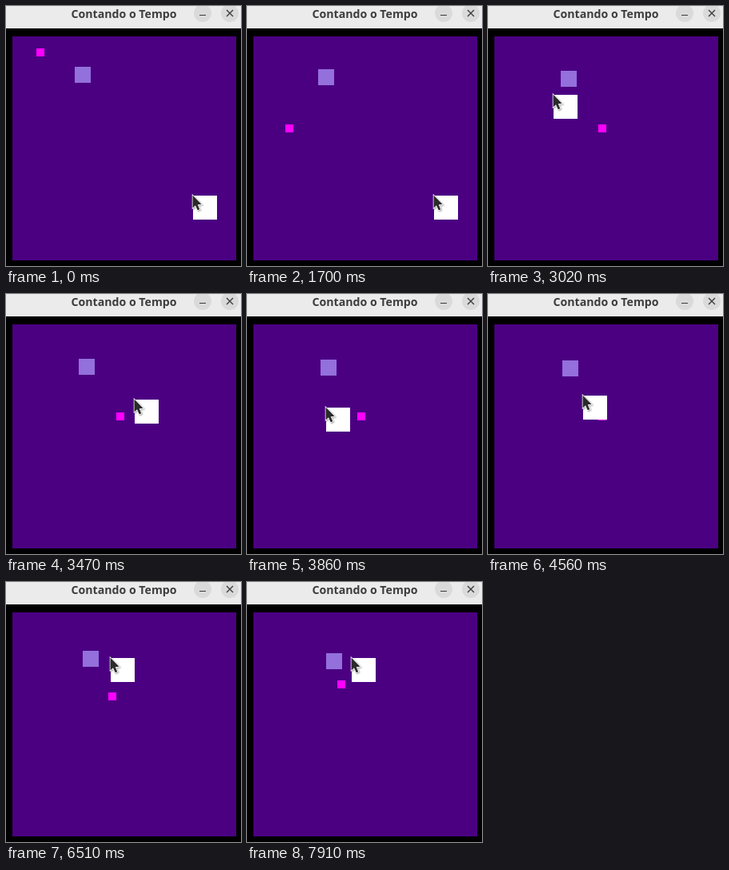
Animation, 294 px wide and 325 px high, one loop 8000 ms. Source, as an HTML page with a canvas:

```html
<!DOCTYPE html>
<html lang="pt">
<head>
<meta charset="utf-8">
<title>Contando o Tempo</title>
<style>
html, body { margin: 0; width: 294px; height: 325px; overflow: hidden; background: #000; }
canvas { display: block; }
</style>
</head>
<body>
<canvas id="stage" width="294" height="325"></canvas>
<script>
const ctx = document.getElementById('stage').getContext('2d');
const LOOP = 8000, TICK = 77.4; // ms

// Key points: tick, then the values reached there
const drift = [[0, 0.24], [24.5, 4], [68, 8], [101, 13]];
const down = [[0, 0], [8, 19]];
const right = [[15, 0], [16, 1], [21, 1], [22, 2], [30, 20]];
const taps = [[71, 0], [72, 1], [84, 4], [89, 5], [96, 8], [102, 10]];
// Centre x, centre y and radius of the circling hand
const orbit = [
  [30, 234, 237, 0], [32, 218, 191, 0], [39, 118.5, 141.8, 46], [50, 128, 133.5, 30],
  [59, 138.8, 129.9, 20], [68, 134, 97, 0], [70, 131, 95, 0]
];

const clamp = (v, lo, hi) => Math.max(lo, Math.min(hi, v));

function along(points, n) {
  n = clamp(n, points[0][0], points.at(-1)[0]);
  const i = Math.max(1, points.findIndex(p => p[0] >= n));
  const a = points[i - 1], b = points[i];
  const f = (n - a[0]) / (b[0] - a[0]);
  return a.slice(1).map((v, k) => v * (1 - f) + b[k + 1] * f);
}

const steps = (points, n) => Math.floor(along(points, n)[0] + 1e-6);

function hand(n) {
  const [cx, cy, r] = along(orbit, n);
  const angle = 2 * Math.PI * (n - 40) / 9.6;
  return [Math.round(cx - r * Math.cos(angle)), Math.round(cy + 1.1 * r * Math.sin(angle))];
}

function box(color, x, y, w, h = w) {
  ctx.fillStyle = color;
  ctx.fillRect(x, y, w, h);
}

function button(x) {
  ctx.fillStyle = '#dadada';
  ctx.beginPath();
  ctx.arc(x, 9, 11, 0, 7);
  ctx.fill();
}

function titleBar() {
  box('#ebebeb', 0, 0, 294, 28);
  ctx.fillStyle = '#3d3d3d';
  ctx.font = 'bold 14.15px "Open Sans", "Noto Sans", sans-serif';
  ctx.textAlign = 'center';
  ctx.fillText('Contando o Tempo', 147.5, 15);
  button(246);
  button(280);
  box('#3d3d3d', 242, 11, 8, 1);
  ctx.strokeStyle = '#3d3d3d';
  ctx.lineWidth = 1.4;
  ctx.stroke(new Path2D('M276 5l8 8M284 5l-8 8'));
}

const arrow = new Path2D('M.5 .5V16.5L4 13.3L6.7 19.3L9.3 18.2L6.7 12.3L11.5 11.8Z');
function pointer(x, y) {
  ctx.save();
  ctx.translate(x, y);
  ctx.strokeStyle = '#fff';
  ctx.lineWidth = 1.5;
  ctx.shadowColor = 'rgba(0, 0, 0, 0.4)';
  ctx.shadowBlur = 2;
  ctx.shadowOffsetX = ctx.shadowOffsetY = 1;
  ctx.stroke(arrow);
  ctx.shadowColor = 'transparent';
  ctx.fillStyle = '#2b2b2b';
  ctx.fill(arrow);
  ctx.restore();
}

function draw(n) {
  box('#000', 0, 0, 294, 325);
  titleBar();
  box('#4b0082', 8, 38, 280);

  const d = steps(drift, n);
  box('#9370db', 86 + d, 76 + d, 20);

  // The taps go two up, five left, then three up
  const tap = steps(taps, n);
  const left = clamp(tap - 2, 0, 5);
  const kx = steps(right, n) - left;
  const ky = steps(down, n) - (tap - left);
  box('#f0f', 38 + 5 * kx, 53 + 5 * ky, 10);

  const [x, y] = hand(n);
  box('#fff', x, y, 30);
  pointer(x - 1, y - 1);
}

const start = performance.now();
function run() {
  const t = (performance.now() - start) % LOOP;
  draw(Math.floor(t / TICK + 0.2));
  requestAnimationFrame(run);
}
run();
</script>
</body>
</html>
```
